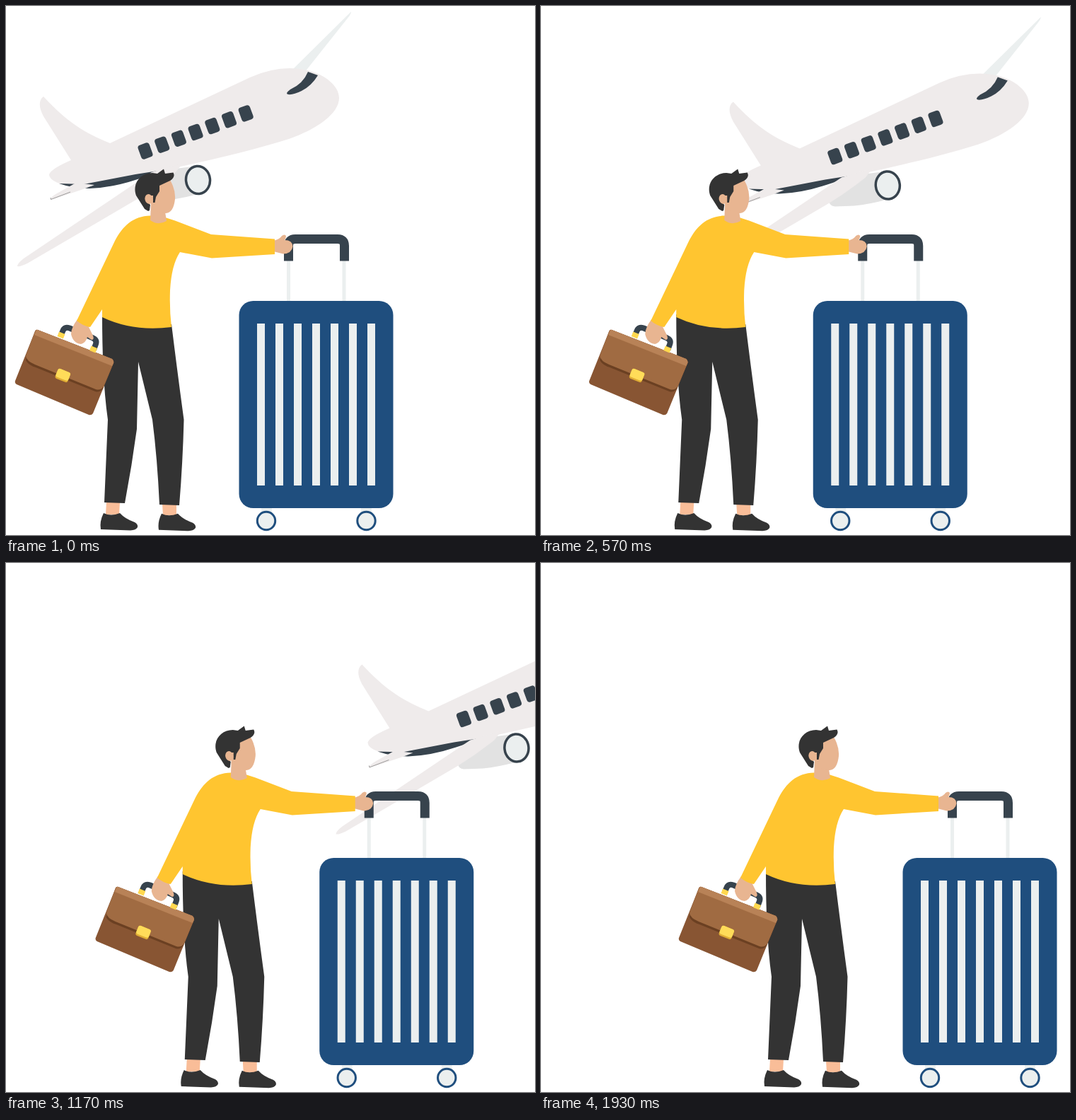
These frames come from a looping animation (748x748 px, 2230 ms). An HTML page:

```html
<!DOCTYPE html>
<html lang="en">
<head>
<meta charset="utf-8">
<title>Traveller</title>
<style>
  html, body { margin: 0; width: 100%; height: 100%; overflow: hidden; background: #fff; }
  svg { display: block; width: 100%; height: 100%; }
  .body { fill: #efebeb; }
  .pale { fill: #ebefef; }
  .slate { fill: #37434d; }
  .dark { fill: #333; }
  .skin { fill: #e8b591; }
  .line { fill: none; stroke: #37434d; }
</style>
</head>
<body>
<svg viewBox="0 0 748 748">
  <g id="plane">
    <path class="pale" d="M488 8Q488 11 484 16L422 94L403 92Z"/>
    <path class="body" d="M53 128C86 164 112 180 147 194L345 101Q388 82 427 91C451 97 471 113 471 130C471 152 440 174 400 188C340 207 270 222 206 236C160 252 110 259 76 251Q61 246 61 238Q64 230 92 218L53 156C46 143 46 133 53 128Z"/>
    <path class="slate" d="M75 251L110 252L183 238L215 233Q200 241 186 245Q150 257 118 258Q95 258 75 251Z"/>
    <path class="body" d="M63 274Q62 271 72 265L99 250L125 253Q108 260 63 274Z"/>
    <path d="M63 271L63.500 273.500L91 263" fill="none" stroke="#777" stroke-width=".7"/>
    <path d="M189 268L240 230L271 226V266Q245 273 224 275L197 276Q188 275 189 268Z" fill="#e2e2e2"/>
    <path class="body" d="M16 368Q16 364 25 357L206 235L250 222L240 235Q215 255 189 271L114 315L30 364Q20 369 16 368Z"/>
    <ellipse class="pale" cx="271.500" cy="246" rx="17" ry="19.500" stroke="#37434d" stroke-width="3.500" transform="rotate(-6 271.500 246)"/>
    <path class="slate" d="M427 93L441 98Q432 113 418 120Q406 126 399 125Q394 124 402 118Q420 110 427 93Z"/>
    <g id="windows" class="slate"></g>
  </g>

  <g id="walker">
    <g id="suitcase">
      <path class="pale" d="M397 358h5v60h-5zM475.500 358h5v60h-5zM361 709h15v8h-15zM502 709h15v8h-15z"/>
      <path class="line" stroke-width="13" d="M399.500 360.500V339Q399.500 329.500 409 329.500H469Q478.500 329.500 478.500 339V360.500"/>
      <rect x="329.500" y="417" width="218" height="293" rx="20" fill="#1f4e7e"/>
      <g id="ribs" class="pale"></g>
      <g class="pale" stroke="#1f4e7e" stroke-width="3">
        <circle cx="368" cy="728" r="12.700"/>
        <circle cx="509.500" cy="728" r="12.700"/>
      </g>
    </g>

    <path fill="#f9bd98" d="M142 701L161 702L160 719H141ZM221 704L241 705V720H222Z"/>
    <path id="shoe" class="dark" d="M138 717Q148 722 161 717Q168 725 182 730Q187 733 186 737Q184 741 176 741.500L134 740Q132 729 138 717Z"/>
    <use href="#shoe" x="82" y=".8"/>
    <path class="dark" d="M136 436L234 450Q242 515 251.500 585Q250 645 245 706L217 705Q214 640 207 585L187 503L185 598Q178 650 168 703L139 702L144 585Q136 530 136 436Z"/>

    <path d="M45 458L150 499Q153 502 152 505L123 576Q121 579 117 578L15 535Q12 533 13 530L41 460Q42 457 45 458Z" fill="#885533"/>
    <path d="M29 493L28 501Q32 508 42 511L126 545Q132 547 137 541L139 534Z" fill="#6b4022"/>
    <path d="M45 458L150 499Q153 502 152 505L138 538Q134 544 127 542L41 507Q29 502 28 495L41 460Q42 457 45 458Z" fill="#a06b42"/>
    <path d="M45 458L150 499Q153 502 152 505L150 509L40 465L42 460Q43 457 45 458Z" fill="#b88257"/>
    <g transform="translate(80.500 522) rotate(22)">
      <rect x="-9.500" y="-7" width="19" height="15" rx="3" fill="#e0ad35"/>
      <rect x="-9.500" y="-7" width="19" height="12.500" rx="3" fill="#ffdc59"/>
    </g>
    <path class="line" stroke-width="8" d="M78 465L80.500 459Q83 453 90 455.500L122 469Q129 472 127 478L124 486"/>
    <g fill="#ffd84f">
      <rect id="foot" x="-4.500" y="-3.500" width="9" height="7" transform="translate(78 465.500) rotate(22)"/>
      <use href="#foot" x="45.500" y="20"/>
    </g>

    <path class="skin" d="M101 443Q92 455 92 464Q95 477 106 478Q113 476 115 468L121 472Q125 472 123 466L117 454L120 450Z"/>
    <path class="skin" d="M378 332Q387 330 390 325Q394 322 396 325Q396 328 394 331Q405 331 405.500 340Q404 350 392 350.500L378 347Z"/>
    <path fill="#ffc530" d="M204 296.500C180 297 165 311 154 332L100 445Q108 452 119 454L136 429V440Q180 461 234 454Q231 430 232 402Q234 366 246 348L291 356.500L380 351V329.500L290 323L239 303.500L225 299Z"/>
    <path class="skin" d="M205 278L204 303Q215 311 227 304L225 291Z"/>
    <path class="skin" d="M205 255L232 246Q240 260 239 273Q237 292 226 293Q213 293 205 284Z"/>
    <path class="dark" d="M201 290L196 287L184 268C178 251 190 236 207 236L214 237L223 230.500L225 237L236.500 235.500Q240 242 232 247L217 254V262L212 270L210.500 278L208 278V268H202L198 276L204 281L203 289Z"/>
    <ellipse class="skin" cx="202" cy="273" rx="5.500" ry="7" transform="rotate(-15 202 273)"/>
  </g>
</svg>
<script>
const LOOP = 2230;
const LAST = 58;
const byId = id => document.getElementById(id);

const repeat = (id, count, make) => {
  byId(id).innerHTML = Array.from({ length: count }, (_, i) => make(i)).join('');
};
repeat('windows', 7, i =>
  `<rect x="-8.5" y="-10.5" width="17" height="21" rx="4" transform="translate(${197 + 23.7 * i} ${205 - 8.85 * i}) rotate(-20)"/>`);
repeat('ribs', 7, i => `<rect x="${355 + 26 * i}" y="449" width="11" height="229"/>`);

// Constant speed, then even braking to rest over the last `brake` steps.
const glide = (step, speed, brake) => {
  const late = Math.max(0, step - (LAST - brake));
  return speed * (step - late * late / (2 * brake));
};

const move = (id, x, y) => byId(id).setAttribute('transform', `translate(${x} ${y})`);

const start = performance.now();
function draw() {
  const time = (performance.now() - start) % LOOP;
  // Thirty steps a second, on a 10 ms clock.
  const step = Math.min(LAST, Math.floor((Math.floor(time / 10) * 10 + 4) * 0.03));
  const flight = glide(step, 12.87, 2.2);
  move('plane', flight, flight * 0.0343);
  move('walker', glide(step, 3.25, 4), 0);
  requestAnimationFrame(draw);
}
draw();
</script>
</body>
</html>
```
